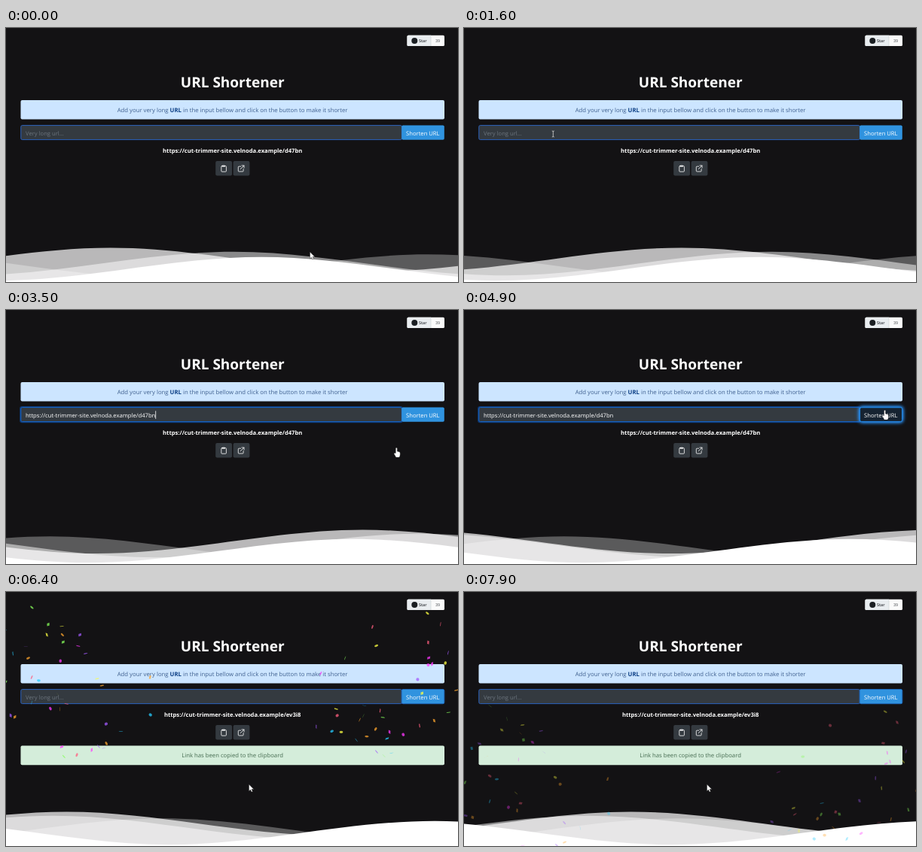
An HTML page with a canvas for the animation above (8 s loop, 600x338 px).

```html
<!DOCTYPE html>
<html lang="en">
<head>
<meta charset="utf-8">
<title>URL Shortener</title>
<style>
  html, body { margin: 0; width: 100%; height: 100%; overflow: hidden; background: #131214; }
  #stage, #confetti { position: absolute; left: 0; top: 0; width: 600px; height: 338px; }
  text { font: 7.65px "Open Sans", "Noto Sans", sans-serif; fill: #fff; text-rendering: geometricPrecision; }
  .mid { text-anchor: middle; }
  .bold { font-weight: 700; }
  .line { fill: none; stroke: #fff; stroke-width: .8; stroke-linecap: round; stroke-linejoin: round; }
  #hover rect { fill: #162331; stroke: #2489e6; filter: drop-shadow(0 0 2px #2a95ff) drop-shadow(0 0 2px #2a95ff); }
</style>
</head>
<body>
<svg id="stage" viewBox="0 0 600 338">
  <defs>
    <path id="wave" d="M-160 44c30 0 58-18 88-18s58 18 88 18 58-18 88-18 58 18 88 18v44h-352z"/>
  </defs>

  <!-- star badge -->
  <rect x="532.5" y="9.8" width="49.5" height="14.2" rx="1.6" fill="#fafafa"/>
  <path d="M564 9.8h-30q-1.5 0-1.5 1.6v11q0 1.6 1.5 1.6h30z" fill="#e9edf0"/>
  <path d="M564 9.8v14.2" stroke="#cfd3d6" stroke-width=".6"/>
  <circle cx="542.3" cy="17" r="4" fill="#1b1f23"/>
  <text x="548" y="19" style="font-size:5.4px;font-weight:600;fill:#33373c">Star</text>
  <text x="573" y="19" class="mid" style="font-size:5.4px;fill:#44484d">39</text>

  <text x="300.7" y="79.3" class="mid bold" style="font-size:19px">URL Shortener</text>

  <rect x="19.5" y="96" width="562.5" height="25.5" rx="2" fill="#cce5ff"/>
  <text x="300.6" y="111.7" class="mid" style="font-size:7.75px;fill:#3f608e">Add your very long <tspan class="bold" fill="#0c3f85">URL</tspan> in the input bellow and click on the button to make it shorter</text>

  <!-- form -->
  <rect id="ring" x="19" y="128.8" width="507" height="20.6" rx="2.4" fill="none" stroke="#0b55b8" stroke-opacity=".55" stroke-width="1.8"/>
  <rect id="input" x="19.8" y="129.6" width="505.6" height="19" rx="1.8" fill="#343a40"/>
  <rect id="button" x="525.2" y="129.5" width="56.6" height="19.2" rx="1.8" fill="#3093df"/>
  <g id="hover"><rect x="525.6" y="129.8" width="56" height="18.6" rx="2"/></g>
  <text id="value" x="26" y="142.6"></text>
  <path id="caret" d="M0 134.3v10.6" stroke="#fff" stroke-width=".8"/>
  <text x="553.3" y="142.5" class="mid">Shorten URL</text>

  <!-- result -->
  <text id="link" x="300.7" y="165.8" class="mid bold" style="font-size:7.62px"></text>
  <rect x="278.2" y="177" width="21.8" height="19.6" rx="2" fill="#343a40"/>
  <rect x="301.6" y="177" width="21.8" height="19.6" rx="2" fill="#343a40"/>
  <g class="line">
    <rect x="285.8" y="183.6" width="6.6" height="7.6" rx=".9"/>
    <path d="M287.6 183.1h3v1.2h-3z"/>
    <path d="M311.6 184.2h-2.4q-.9 0-.9.9v5q0 .9.9.9h5q.9 0 .9-.9v-2.5M313 183h3v3M311.2 187.8l4.7-4.7"/>
  </g>
  <g id="notice">
    <rect x="19.5" y="204.5" width="562.5" height="25.7" rx="2" fill="#d4edda"/>
    <text x="300.6" y="220.2" class="mid" style="font-size:7.73px;fill:#456b50">Link has been copied to the clipboard</text>
  </g>

  <svg y="289" width="600" height="49" viewBox="0 24 150 28" preserveAspectRatio="none" fill="#fff">
    <use class="wave" href="#wave" fill-opacity=".7"/>
    <use class="wave" href="#wave" fill-opacity=".5"/>
    <use class="wave" href="#wave" fill-opacity=".3"/>
    <use class="wave" href="#wave"/>
  </svg>

  <g id="cursor">
    <path id="arrow" d="M0 0V9l2-1.9 1.3 3 1.6-.7-1.3-2.9h2.8z" fill="#fff" stroke="#222" stroke-width=".4"/>
    <path id="beam" d="M-1.5-4Q0-4 0-3.2Q0-4 1.5-4M0-3.4V3.4M-1.5 4Q0 4 0 3.2Q0 4 1.5 4" fill="none" stroke="#d8d8d8" stroke-width=".8"/>
    <path id="hand" d="M-1.7 1V-5.2a1 1 0 0 1 2 0V-1.4L3-.8Q4.2-.5 4.2 1V3Q4 6 2.7 6.6H-1.4Q-2 5-3.8 2.3Q-4.4.8-3 .7Z" fill="#fff" stroke="#222" stroke-width=".4"/>
  </g>
</svg>
<canvas id="confetti" width="600" height="338"></canvas>

<script>
const LOOP = 8000, FOCUS = 2000, PASTE = 3000, DONE = 5450;
const HOST = 'https://cut-trimmer-site.velnoda.example/';
const OLD_LINK = HOST + 'd47bn', NEW_LINK = HOST + 'ev3i8';
const $ = id => document.getElementById(id);
const ctx = $('confetti').getContext('2d');
const show = (id, on) => $(id).style.display = on ? '' : 'none';
const clamp = v => Math.min(1, Math.max(0, v));
const smooth = v => v * v * (3 - 2 * v);
const setText = (id, s) => { if ($(id).textContent !== s) $(id).textContent = s; };

// Waves: vertical offset, period and lead in seconds
const WAVES = [[0, 7, 2], [3, 10, 3], [5, 13, 4], [7, 20, 5]];
const WAVE_CLOCK = 157.85;
const waveEls = document.querySelectorAll('.wave');

function drawWaves(t) {
  WAVES.forEach(([y, period, lead], i) => {
    const p = (WAVE_CLOCK + lead + t / 1000) / period % 1;
    const eased = p - .016 * Math.sin(2 * Math.PI * p);
    waveEls[i].setAttribute('transform', `translate(${48 - 90 + 175 * eased} ${y})`);
  });
}

// Pointer stops: time, x, y
const STOPS = [[0, 403.5, 298], [800, 121.5, 151], [1000, 118.3, 141], [2700, 118.3, 141],
  [3500, 519, 189.5], [4000, 559.3, 139.5], [DONE, 559.3, 139.5], [6000, 322.5, 256], [LOOP, 322.5, 256]];

function drawCursor(t) {
  const i = STOPS.findIndex(s => s[0] > t);
  const [t0, x0, y0] = STOPS[i - 1], [t1, x1, y1] = STOPS[i];
  const k = smooth((t - t0) / (t1 - t0));
  $('cursor').setAttribute('transform', `translate(${x0 + (x1 - x0) * k} ${y0 + (y1 - y0) * k})`);
  const kind = t < 950 ? 'arrow' : t < 2850 ? 'beam' : t < 5520 ? 'hand' : 'arrow';
  ['arrow', 'beam', 'hand'].forEach(id => show(id, id === kind));
}

function drawForm(t) {
  const focused = t >= FOCUS && t < DONE, pasted = t >= PASTE && t < DONE, done = t >= DONE;
  show('ring', focused);
  $('input').setAttribute('stroke', focused ? '#1467cf' : '#2c62bd');
  $('button').setAttribute('stroke', done ? '#1f69bd' : 'none');
  $('value').style.fill = pasted ? '#fff' : '#6c757d';
  setText('value', pasted ? OLD_LINK : 'Very long url...');
  setText('link', done ? NEW_LINK : OLD_LINK);
  show('notice', done);
  const blink = (t - (pasted ? PASTE : FOCUS)) % 1060 < 530;
  show('caret', focused && blink);
  const end = pasted ? 26 + $('value').getComputedTextLength() : 26;
  $('caret').setAttribute('transform', `translate(${end + .4} 0)`);
  $('hover').style.opacity = clamp((t - 3850) / 200) * clamp(1 - (t - DONE) / 200);
}

// Confetti: two side cannons with drag, gravity and wobble
const COLORS = ['#26ccff', '#a25afd', '#ff5e7e', '#88ff5a', '#fcff42', '#ffa62d', '#ff36ff'];
const SCALE = .4875;
const rnd = (i, k) => { const v = Math.sin(i * 127.1 + k * 311.7) * 43758.5; return v - Math.floor(v); };

function drawConfetti(t) {
  ctx.clearRect(0, 0, 600, 338);
  const n = (t - DONE) * .06;
  if (n < 0) return;
  ctx.globalAlpha = clamp(1 - n / 230);
  for (let i = 1; i <= 90; i++) {
    const left = i % 2, angle = (60 + (rnd(i, 1) - .5) * 84) * Math.PI / 180;
    const reach = (80 + 158 * rnd(i, 2)) * (1 - .9 ** n);
    const x = (left ? 0 : 600) + (left ? 1 : -1) * Math.cos(angle) * reach;
    const y = 169 - Math.sin(angle) * reach + 3 * SCALE * n;
    const wobble = rnd(i, 3) * 10 + n * Math.min(.11, rnd(i, 4) * .1 + .05);
    const tilt = (rnd(i, 5) * .5 + .25) * Math.PI + n * .1;
    const size = (rnd(i, 6) + 2) * SCALE;
    const dx = size * Math.cos(tilt), dy = size * Math.sin(tilt);
    const wx = x + 10 * SCALE * Math.cos(wobble), wy = y + 10 * SCALE * Math.sin(wobble);
    ctx.fillStyle = COLORS[i % 7];
    ctx.beginPath();
    if (i % 4 < 2) {
      ctx.ellipse(x, y, Math.abs(wx - x) * .6, Math.abs(wy - y) * .6, Math.PI / 10 * wobble, 0, 7);
    } else {
      ctx.moveTo(x, y);
      ctx.lineTo(wx, y + dy);
      ctx.lineTo(wx + dx, wy + dy);
      ctx.lineTo(x + dx, wy);
    }
    ctx.fill();
  }
}

const start = performance.now();
function frame() {
  const t = (performance.now() - start) % LOOP;
  drawWaves(t);
  drawForm(t);
  drawCursor(t);
  drawConfetti(t);
  requestAnimationFrame(frame);
}
frame();
</script>
</body>
</html>
```
